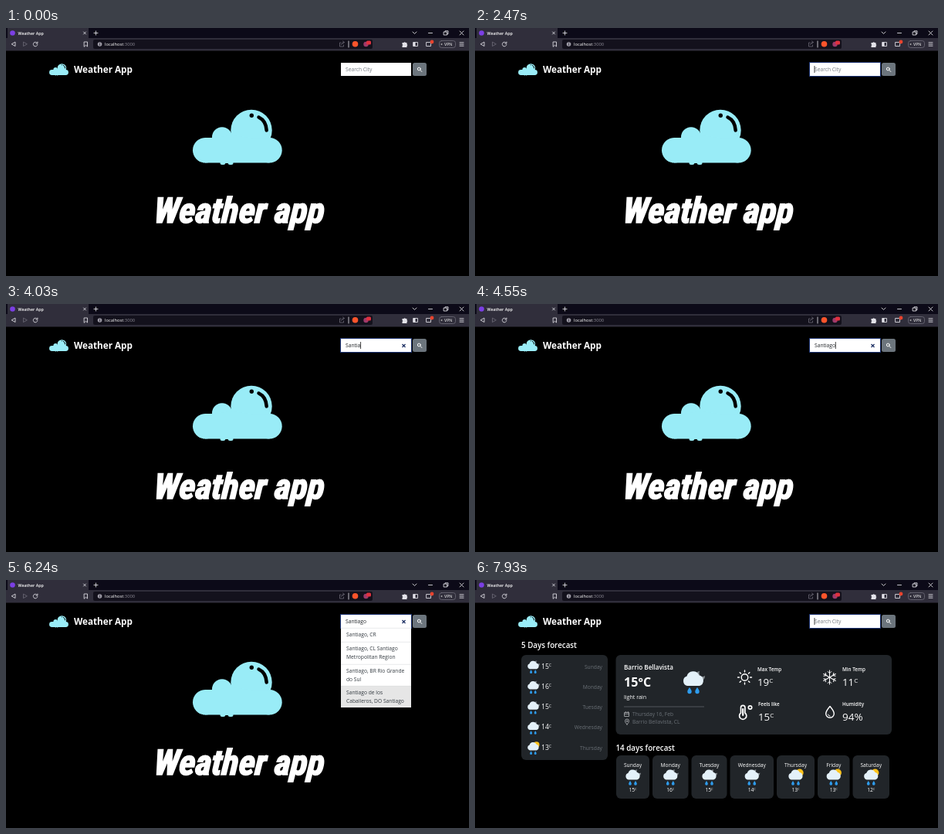
These frames come from a looping animation (600x321 px, 8 s). An HTML page:

```html
<!DOCTYPE html>
<html lang="en">
<head>
<meta charset="utf-8">
<title>Weather App</title>
<style>
html, body { margin: 0; width: 100%; height: 100%; overflow: hidden; background: #000; }
svg { display: block; width: 100%; height: 100%; font: 6.7px "Open Sans", "Noto Sans", sans-serif; }
text { fill: #fff; white-space: pre; }
.line { fill: none; stroke: #fff; stroke-linecap: round; stroke-linejoin: round; }
.chrome { stroke: #d8d7de; stroke-width: .9; }
.faint { stroke: #777582; stroke-width: .7; }
.semi { font-weight: 600; }
.dim, .dim text { fill: #6a7076; }
.title { font-family: "Roboto Condensed", Roboto, "Open Sans", sans-serif; font-weight: 900;
  font-stretch: 75%; font-style: italic; stroke: #fff; stroke-width: 1.6px; }
.card { fill: #212529; }
#list text { fill: #333a40; }
</style>
</head>
<body>
<svg viewBox="0 0 600 321" preserveAspectRatio="none">
  <defs>
    <g id="cloud">
      <g fill="#99ecf7">
        <circle cx="258.200" cy="158.300" r="16.200"/>
        <circle cx="280" cy="141.300" r="13"/>
        <circle cx="318" cy="132.500" r="26.700"/>
        <circle cx="341.500" cy="158.300" r="16.200"/>
        <path d="M258 142.100h10l24-3.500 28 4h21.500v31.900H294.500q0 2.500-2.500 2.500h-2q-2 0-2.500-2h-3q-.5 2-2.500 2h-2q-2.500 0-2.500-2.500H258z"/>
      </g>
      <circle cx="318.300" cy="113.300" r="2.700"/>
      <path d="M327.500 115.500Q337 120 337.700 132.500" fill="none" stroke="#000" stroke-width="4.500" stroke-linecap="round"/>
    </g>
    <g id="rain">
      <path fill="#e4f1f9" d="M7 20a6.500 6.500 0 0 1-.5-12.500a8.500 8.500 0 0 1 16-1a7 7 0 0 1 .5 13.500z"/>
      <path id="drop" fill="#2e9ced" d="M10 22q-3 4-2.700 5.500a2.700 2.700 0 0 0 5.400 0q.3-1.500-2.700-5.500z"/>
      <use href="#drop" x="10"/>
    </g>
    <g id="night">
      <circle cx="23.500" cy="7.500" r="6.500" fill="#858b90"/>
      <circle cx="27" cy="3.500" r="4.500" class="card"/>
      <use href="#rain"/>
    </g>
    <g id="day"><circle cx="22.500" cy="7" r="7" fill="#fcc21b"/><use href="#rain"/></g>
  </defs>

  <!-- browser frame -->
  <rect width="600" height="13" fill="#0c0a18"/>
  <rect y="13" width="600" height="16.500" fill="#302e3b"/>
  <rect x="2" width="105" height="14" fill="#302e3b"/>
  <circle cx="8.500" cy="6.500" r="3.300" fill="#7b3fe4"/>
  <text class="semi" x="15.500" y="8.800" font-size="5.300">Weather App</text>
  <rect x="113" y="15" width="362" height="12" rx="2" fill="#13111c"/>
  <circle cx="121.500" cy="21" r="2.800" fill="#9c9aa5"/>
  <path d="M121.500 20.500v2m0-3.300v.6" stroke="#13111c" stroke-width=".8"/>
  <text x="128" y="23" font-size="5.800">localhost<tspan fill="#8d8b96">:3000</tspan></text>
  <g class="line chrome">
    <path d="M100.500 5l3 3m0-3l-3 3M114 6.500h5m-2.500-2.500v5M527 5l2.500 2.500L532 5M547.500 6.500h5M567.500 5h4v4h-4zm1.500 0v-1.200h4v4h-1.300M588 4l5 5m0-5l-5 5"/>
    <path d="M12 18.500v5l-4.500-2.500zM40.500 19.500a2.800 2.800 0 1 0 .4 2m0-3.500v2h-2M101.500 18h4v6l-2-1.700-2 1.700z"/>
    <path d="M444 17v8M528 18.500h5.500v5h-5.500zM545 18.500h5.500v5h-5.500zM588 18.800h5m-5 2.200h5m-5 2.200h5"/>
  </g>
  <g class="line faint">
    <path d="M22.500 18.500v5l4.500-2.500zM434 19h-1.500v5h5v-2m-3-.5q.5-3 3.500-3m-1.500-1.500l2 1.500-2 1.500"/>
    <rect x="561.500" y="16.500" width="21" height="9" rx="3"/>
  </g>
  <path fill="#e4e3ea" d="M513.500 19h2a1.200 1.200 0 0 1 2.300 0h1.700v2a1.200 1.200 0 0 1 0 2.200v1.800h-6v-2a1.200 1.200 0 0 0 0-2zM528 18.500h2.500v5H528z"/>
  <circle cx="452.500" cy="20.700" r="3.800" fill="#fb542b"/>
  <circle cx="466.500" cy="21" r="3.200" fill="#9e3a6a"/>
  <rect x="467" y="16.500" width="6" height="5" rx="1.500" fill="#e0313f"/>
  <circle cx="552" cy="18" r="2.400" fill="#e8432e"/>
  <circle cx="564.500" cy="21" r="1" fill="#aaa"/>
  <text x="568" y="23" font-size="5.300">VPN</text>

  <!-- page header -->
  <use href="#cloud" transform="translate(4 23.400) scale(.215)"/>
  <text x="88" y="58.300" font-size="11.700" font-weight="650">Weather App</text>
  <rect x="434" y="45" width="91" height="17" fill="#fff"/>
  <rect id="ring" x="433.500" y="44.500" width="92" height="18" fill="none" stroke="#1b3272"/>
  <text id="query" x="440" y="56.200"></text>
  <path id="caret" d="M0 49v9" stroke="#111" stroke-width=".8"/>
  <path id="clear" d="M513.500 52l4 4m0-4l-4 4" stroke="#1c2f63" stroke-width="1.300"/>
  <rect x="527" y="45" width="18" height="17" rx="2.500" fill="#6c757d"/>
  <g class="line"><circle cx="535.300" cy="53" r="1.900"/><path d="M536.800 54.500l2 2"/></g>

  <g id="landing">
    <use href="#cloud"/>
    <text class="title" id="title" transform="translate(191 252) skewX(-4)">Weather app</text>
  </g>
  <g id="list"></g>

  <g id="results">
    <text class="semi" x="60" y="87.500" font-size="9.800">5 Days forecast</text>
    <text class="semi" x="182.500" y="220.500" font-size="9.800">14 days forecast</text>
    <rect class="card" x="60" y="97" width="112" height="136" rx="6"/>
    <rect class="card" x="182.500" y="97" width="357.500" height="103" rx="6"/>
    <text class="semi" x="193" y="116" font-size="8.100">Barrio Bellavista</text>
    <text x="193" y="138.300" font-size="16" font-weight="700">15°C</text>
    <text x="193" y="154.300" font-size="7.100">light rain</text>
    <use href="#night" transform="translate(268 117)"/>
    <path d="M193 164h104" stroke="#5d6267" stroke-width=".8"/>
    <g class="dim">
      <text x="204" y="176">Thursday 16, Feb</text>
      <text x="204" y="186.300">Barrio Bellavista, CL</text>
    </g>
    <g class="line" style="stroke:#b5b8bb;stroke-width:.8">
      <path d="M194 171.500h5.500v5h-5.500zm0 1.800h5.500m-4.200-2.800v1m3-1v1M197 187q-2.800-3-2.500-4.500a2.500 2.500 0 0 1 5 0q.3 1.500-2.500 4.500z"/>
      <circle cx="197" cy="182.700" r=".7"/>
    </g>
    <g class="line" stroke-width="1.400">
      <circle cx="349.500" cy="126" r="4.300"/>
      <g id="rays"></g>
      <path d="M344.500 172v-7a2.700 2.700 0 0 1 5.400 0v7a4.600 4.600 0 1 1-5.400 0z" stroke-width="1.700"/>
      <path d="M347.200 167v8" stroke-width="2.200"/>
      <circle cx="356.500" cy="165" r="2.200" stroke-width="1.700"/>
      <path d="M460 163.500q-5.500 6.500-5.300 9.500a5.300 5.300 0 0 0 10.600 0q.2-3-5.300-9.500z"/>
      <path d="M457.500 174q.5 2 2.500 2.200" stroke-width="1"/>
      <g id="flake" stroke-width="1"></g>
    </g>
  </g>
</svg>
<script>
const $ = id => document.getElementById(id);
const add = (id, markup) => $(id).insertAdjacentHTML("beforeend", markup);
const show = (id, on) => $(id).style.display = on ? "" : "none";
const LOOP = 8000, STEP = 130, FOCUS = 2080, TYPE = 3380, TYPED = 4290,
  OPEN = 5070, PICK = 6890, RESULT = 7670, WORD = "Santiago";

// search suggestions
const rows = [
  [62, 18, "Santiago, CR"],
  [80, 29, "Santiago, CL Santiago", "Metropolitan Region"],
  [109, 28, "Santiago, BR Rio Grande", "do Sul"],
  [137, 28, "Santiago de los", "Caballeros, DO Santiago"]
];
rows.forEach(([y, h, ...lines], i) => add("list",
  `<rect id="row${i}" x="434" y="${y}" width="91" height="${h}"/>
   <path d="M434 ${y + .3}h91" stroke="#d9dbdd" stroke-width=".6"/>` +
  lines.map((s, k) => `<text x="441" y="${y + 11.2 + k * 10.4}">${s}</text>`).join("")));

// forecast cards
const temp = (x, y, n, size, more = "") =>
  `<text x="${x}" y="${y}" font-size="${size}" ${more}>${n}<tspan font-size="${size * .6}" dy="${-size * .27}">C</tspan></text>`;
const icon = (kind, x, y, s) => `<use href="#${kind}" transform="translate(${x} ${y}) scale(${s})"/>`;

[["Sunday", 15], ["Monday", 16], ["Tuesday", 15], ["Wednesday", 14], ["Thursday", 13]].forEach(([name, n], i) => {
  const y = 114.5 + i * 26.3;
  add("results", icon(i < 4 ? "night" : "day", 67, y - 10.5, .56) + temp(86, y, n, 8.6) +
    `<text class="dim" x="165" y="${y}" text-anchor="end">${name}</text>`);
});

[["Sunday", 183, 43, 15], ["Monday", 230, 46.5, 16], ["Tuesday", 280.5, 46, 15], ["Wednesday", 330.5, 56.5, 14],
 ["Thursday", 391, 49, 13], ["Friday", 444, 41.5, 13], ["Saturday", 489.5, 47.5, 12]].forEach(([name, x, w, n], i) => {
  const mid = x + w / 2;
  add("results", `<rect class="card" x="${x}" y="227" width="${w}" height="56" rx="6"/>
    <text x="${mid}" y="241.7" text-anchor="middle">${name}</text>` +
    icon(i < 4 ? "night" : "day", mid - 10.5, 244.5, .7) + temp(mid, 273.5, n, 6.7, 'text-anchor="middle"'));
});

[["Max Temp", 366, 118, 19], ["Min Temp", 476, 118, 11], ["Feels like", 367, 163, 15], ["Humidity", 476, 163]].forEach(([name, x, y, n]) =>
  add("results", `<text class="semi" x="${x}" y="${y}" font-size="6.3">${name}</text>` +
    (n ? temp(x, y + 18.8, n, 13.3) : `<text x="${x}" y="${y + 18.8}" font-size="13.5">94%</text>`)));

for (let a = 0; a < 360; a += 45)
  add("rays", `<path d="M349.500 119v-2" transform="rotate(${a} 349.500 126)"/>`);
for (let a = 0; a < 360; a += 60)
  add("flake", `<path d="M459.500 126v-9m-2.300 1.500l2.300 2.300 2.300-2.300" transform="rotate(${a} 459.500 126)"/>`);

// the headline's size follows the width of the available face
$("title").style.fontSize = "100px";
$("title").style.fontSize = 100 * 221 / $("title").getComputedTextLength() + "px";

function hovered(t) {
  if (t < 5850) return -1;
  return t < 6370 ? Math.min(3, Math.floor((t - 5850) / STEP)) : t < 6500 ? 2 : 1;
}

function draw(t) {
  const typing = t >= TYPE && t < PICK;
  const word = typing ? WORD.slice(0, Math.floor((t - TYPE) / STEP) + 1) : "";
  const query = $("query");
  query.textContent = word || "Search City";
  query.style.fill = word ? "#212529" : "#757b82";

  const since = t >= PICK ? t - PICK : t >= TYPED ? t - TYPED : t >= TYPE ? 0 : t - FOCUS;
  show("caret", t >= FOCUS && Math.floor(since / 520) % 2 === 0);
  const x = 440 + (word ? query.getComputedTextLength() + .3 : 0);
  $("caret").setAttribute("transform", `translate(${x} 0)`);

  show("ring", t >= FOCUS);
  show("clear", typing);
  show("list", t >= OPEN && t < PICK);
  rows.forEach((_, i) => $("row" + i).setAttribute("fill", i === hovered(t) ? "#e6e6e6" : "#fff"));
  show("landing", t < RESULT);
  show("results", t >= RESULT);
}

const start = performance.now();
(function tick() {
  draw((performance.now() - start) % LOOP);
  requestAnimationFrame(tick);
})();
</script>
</body>
</html>
```
